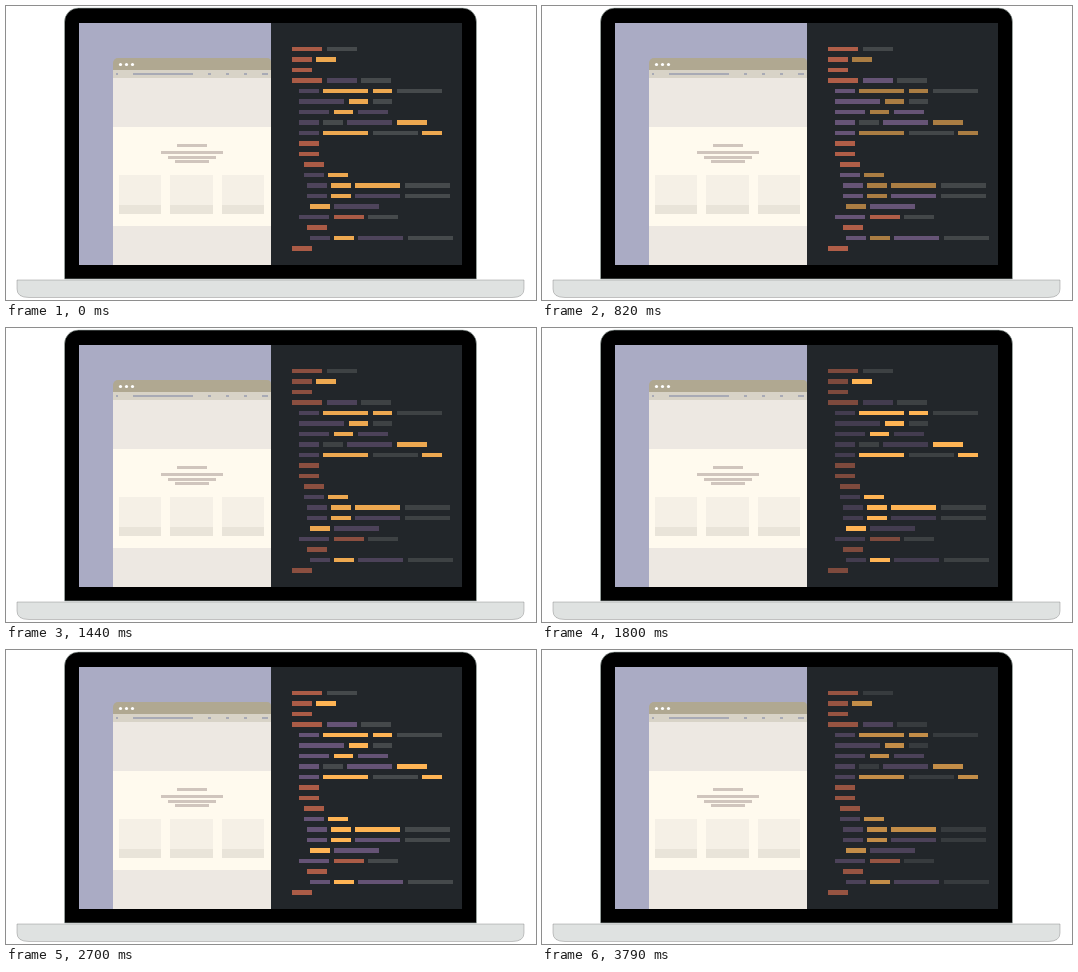
Animation of 530x294 px, one loop 3.89 s. Source, as an HTML page:

```html
<!DOCTYPE html>
<html lang="en">
<head>
<meta charset="utf-8">
<title>Laptop with flickering code</title>
<style>
  html, body { margin: 0; width: 100%; height: 100%; overflow: hidden; background: #fff; }
  svg { display: block; width: 530px; height: 294px; }
</style>
</head>
<body>
<svg viewBox="0 0 530 294">
  <!-- laptop -->
  <path d="M58.5 273V16a14 14 0 0 1 14-14H456.500a14 14 0 0 1 14 14V273z" stroke="#a9b8b3" stroke-width=".6"/>
  <path d="M11 274H518V283Q518 291.500 506 291.500H23Q11 291.500 11 283z" fill="#dfe2e1" stroke="#777" stroke-width=".4"/>
  <path d="M73 17h192v242H73z" fill="#aaabc4"/>
  <path d="M265 17h191v242H265z" fill="#22262a"/>

  <!-- browser window -->
  <path d="M107 64V57a5 5 0 0 1 5-5H261a4 4 0 0 1 4 4V64z" fill="#b0a891"/>
  <g fill="#fff">
    <circle cx="114.500" cy="58.500" r="1.600"/>
    <circle cx="120.500" cy="58.500" r="1.600"/>
    <circle cx="126.500" cy="58.500" r="1.600"/>
  </g>
  <path d="M107 64h158v8H107z" fill="#d8d3c7"/>
  <path d="M110 67h2v2h-2zM127 67h60v2h-60zM202 67h3v2h-3zM220 67h3v2h-3zM238 67h3v2h-3zM256 67h6v2h-6z" fill="#a8aab5"/>
  <path d="M107 72h158v187H107z" fill="#ede8e2"/>
  <path d="M107 121h158v99H107z" fill="#fffaee"/>
  <path d="M171 138h30v3h-30zM155 145h62v3h-62zM162 150h48v3h-48zM169 154h34v3h-34z" fill="#d0c5bd"/>
  <path d="M113 169h42v30h-42zM164 169h43v30h-43zM216 169h42v30h-42z" fill="#f5f0e6"/>
  <path d="M113 199h42v9h-42zM164 199h43v9h-43zM216 199h42v9h-42z" fill="#e9e4d9"/>

  <!-- code tokens, one group per colour -->
  <g id="r" fill="#b05e48"/>
  <g id="p" fill="#665476"/>
  <g id="o" fill="#ffb454"/>
  <g id="g" fill="#464a4c"/>
</svg>
<script>
  const LOOP = 3890, LAST_CHANGE = 3790, STEP = 555.7;
  const WIDTH = { S: 19.5, M: 30, L: 45 }, GAP = 4.5;

  // Each line: left edge, then tokens as colour + size
  const lines = `286 rM gM
286 rS oS
286 rS
286 rM pM gM
293 pS oL oS gL
293 pL oS gS
293 pM oS pM
293 pS gS pL oM
293 pS oL gL oS
293 rS
293 rS
298 rS
298 pS oS
301 pS oS oL gL
301 pS oS pL gL
304 oS pL
293 pM rM gM
301 rS
304 pS oS pL gL
286 rS`.split('\n');

  // Opacity at the start of each step
  const levels = {
    r: [.96, 1, 1, .6, .96, .97, .62, .84],
    p: [.65, 1, 1, .42, .9, 1, .76, .61],
    o: [.92, .47, .78, 1, 1, 1, .73, .73],
    g: [1, .95, .9, .73, .9, 1, .6, .6]
  };

  const group = id => document.getElementById(id);

  function addToken(colour, x, y, w, h) {
    const rect = document.createElementNS('http://www.w3.org/2000/svg', 'rect');
    Object.entries({ x, y, width: w, height: h }).forEach(([k, v]) => rect.setAttribute(k, v));
    group(colour).append(rect);
  }

  lines.forEach((line, i) => {
    const [left, ...tokens] = line.split(' ');
    const top = Math.round(40.9 + 10.5 * i);
    const bottom = Math.round(45.4 + 10.5 * i);
    let x = +left;
    for (const [colour, size] of tokens) {
      const start = Math.round(x), end = Math.round(x + WIDTH[size]);
      addToken(colour, start, top, end - start, bottom - top);
      x += WIDTH[size] + GAP;
    }
  });

  function draw(now) {
    const t = Math.min(now % LOOP, LAST_CHANGE) / STEP;
    const step = Math.floor(t);
    const eased = (1 - Math.cos((t - step) * Math.PI)) / 2;
    for (const [id, level] of Object.entries(levels)) {
      const opacity = level[step] + (level[step + 1] - level[step]) * eased;
      group(id).setAttribute('opacity', opacity.toFixed(3));
    }
  }

  const origin = performance.now();
  function tick() {
    draw(performance.now() - origin);
    requestAnimationFrame(tick);
  }
  tick();
</script>
</body>
</html>
```
